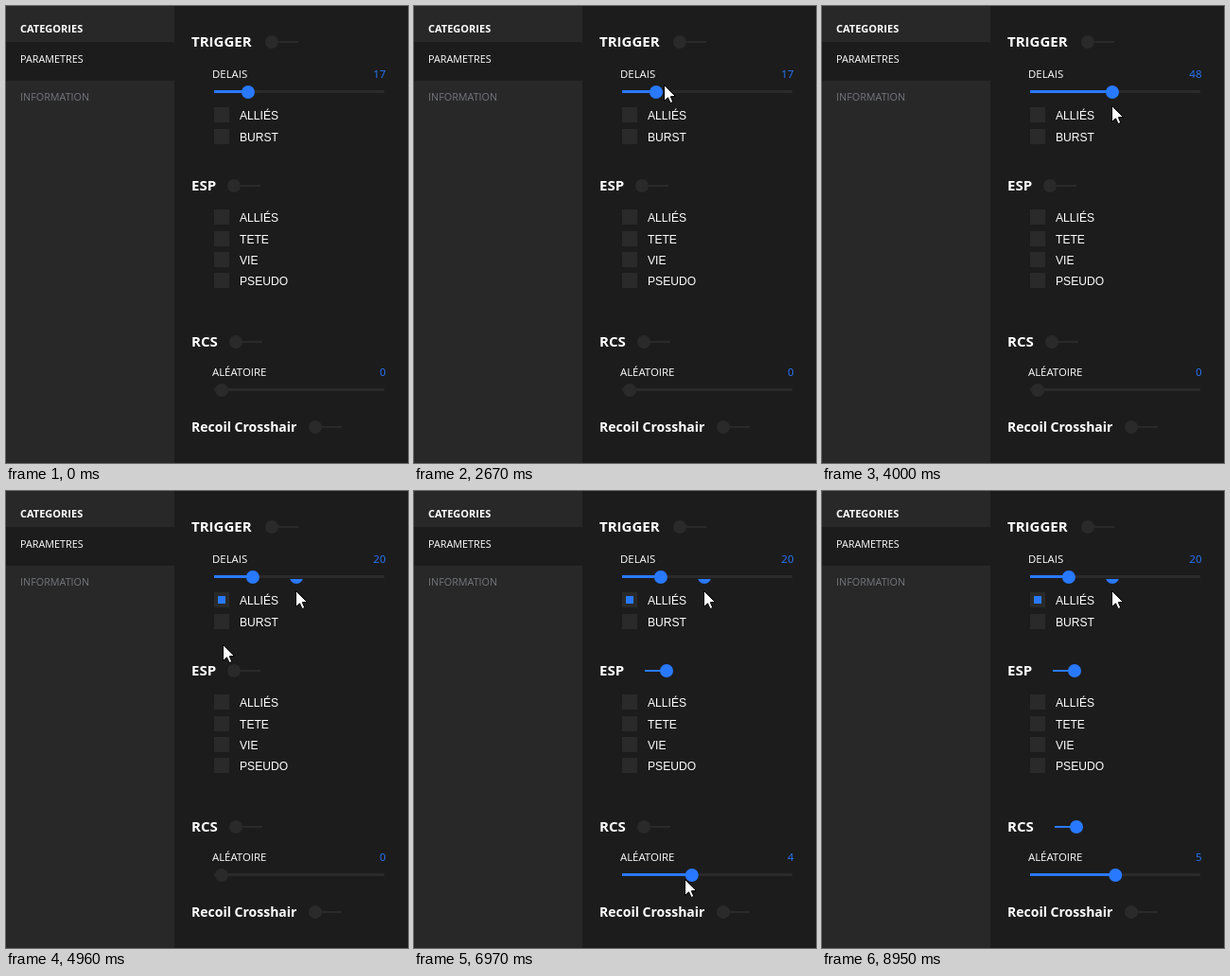
Recreate the animation shown at these times as an HTML page with a canvas. Size 425 by 483 pixels, loop 9.81 s.

```html
<!DOCTYPE html>
<html lang="fr">
<head>
<meta charset="utf-8">
<title>Parametres</title>
<style>
  html, body { margin: 0; width: 100%; height: 100%; overflow: hidden; background: #1c1c1c; }
  canvas { display: block; width: 425px; height: 483px; }
</style>
</head>
<body>
<canvas id="stage"></canvas>
<script>
const W = 425, H = 483, LOOP = 9810, STEP = 73.4;
const BG = '#1c1c1c', PANEL = '#282828', DARK = [42, 42, 42], BLUE = [41, 121, 255];
const canvas = document.getElementById('stage');
const ctx = canvas.getContext('2d');
const dpr = window.devicePixelRatio || 1;
canvas.width = W * dpr;
canvas.height = H * dpr;
ctx.scale(dpr, dpr);

// Pointer moves: start, end, x and y reached
const START = [239, 500];
const MOVES = [
  [60, 930, 272, 36],
  [1390, 1470, 279, 36],
  [2080, 2220, 289, 38],
  [2530, 2890, 254, 101],
  [3420, 3720, 350, 99],
  [3790, 4000, 306, 105],
  [4080, 4160, 260, 106],
  [4230, 4520, 225, 118],
  [4900, 5180, 232, 193],
  [5340, 5920, 250, 356],
  [6000, 6300, 232, 409],
  [6590, 6970, 286, 410],
  [7270, 7410, 307, 405],
  [7480, 8230, 237, 354],
  [8290, 8950, 354, 500]
];

const lerp = (a, b, p) => a + (b - a) * p;
const easeOut = p => Math.sin(p * Math.PI / 2);
const mix = p => `rgb(${DARK.map((v, i) => Math.round(lerp(v, BLUE[i], p))).join()})`;

// The screen refreshes in steps while the pointer moves
function pointer(t) {
  let [x, y] = START;
  for (const [start, end, toX, toY] of MOVES) {
    if (t < start) break;
    const count = Math.round((end - start) / STEP) + 1;
    const done = Math.floor((t - start) / STEP + 0.2) + 1;
    const p = easeOut(Math.min(1, done / count));
    x = lerp(x, toX, p);
    y = lerp(y, toY, p);
  }
  return [Math.round(x), Math.round(y)];
}

// A dragged slider follows the pointer and keeps its last value
function dragged(t, start, end, first, max) {
  if (t < start) return first;
  const [x] = pointer(Math.min(t, end));
  return Math.max(0, Math.round((x - 227) / 164.5 * max));
}

// A switch passes through one half-way step
const flip = (t, start) => t < start ? 0 : t < start + 70 ? 0.5 : 1;

function box(x, y, w, h, color) {
  ctx.fillStyle = color;
  ctx.fillRect(x, y, w, h);
}

function dot(x, y, color) {
  ctx.fillStyle = color;
  ctx.beginPath();
  ctx.arc(x, y, 7, 0, Math.PI * 2);
  ctx.fill();
}

function text(str, x, y, size, color = '#fff', weight = 500, family = '"Open Sans"', align = 'left') {
  ctx.font = `${weight} ${size}px ${family}, sans-serif`;
  ctx.fillStyle = color;
  ctx.textAlign = align;
  ctx.fillText(str, x, y);
}

function toggle(title, x, y, on, size = 15) {
  text(title, 196, y + 5, size, '#fff', 700);
  const left = on ? x + 3 : x;
  const right = on === 1 ? x + 20 : x + 28;
  box(left, y - 1, right - left, 2, mix(on));
  dot(x + 26 * on, y, mix(on));
}

function slider(title, y, value, max) {
  const x = 228 + 164.5 * value / max;
  text(title, 218, y - 15, 11.4);
  text(String(value), 401.5, y - 15, 11.5, mix(1), 500, '"Open Sans"', 'right');
  box(220, y - 2, 180, 3, mix(0));
  if (value) box(220, y - 2, x - 220, 3, mix(1));
  dot(x, y, mix(value ? 1 : 0));
}

function check(label, y, on) {
  box(220, y - 8, 16, 16, mix(0));
  if (on) box(224, y - 4, 8, 8, mix(1));
  text(label, 247, y + 5, 12.1, '#fff', 400, '"Liberation Sans"');
}

function arrow(x, y) {
  ctx.save();
  ctx.translate(x + 0.5, y + 0.5);
  const shape = new Path2D('M0 0V17L4 13.3L6.6 19L9.3 17.9L6.8 12.2L12 12Z');
  ctx.fillStyle = '#fff';
  ctx.fill(shape);
  ctx.strokeStyle = '#000';
  ctx.stroke(shape);
  ctx.restore();
}

// Remains of the drag left on screen under the slider
function trail() {
  ctx.save();
  ctx.beginPath();
  ctx.rect(275, 93, 127, 31);
  ctx.clip();
  dot(307, 91, mix(1));
  arrow(306, 105);
  ctx.restore();
}

function draw(t) {
  box(0, 0, W, H, BG);
  box(0, 0, 178, H, PANEL);
  box(0, 38, 178, 41, BG);
  text('CATEGORIES', 15, 28, 11, '#fff', 700);
  text('PARAMETRES', 15, 60, 10.8);
  text('INFORMATION', 15, 100, 10.8, '#75777d');

  toggle('TRIGGER', 281, 38, flip(t, 1860) - flip(t, 2530));
  slider('DELAIS', 91, dragged(t, 3420, 4160, 17, 100), 100);
  check('ALLIÉS', 115, t >= 4660);
  check('BURST', 138);

  toggle('ESP', 241, 190, flip(t, 5340));
  ['ALLIÉS', 'TETE', 'VIE', 'PSEUDO'].forEach((label, i) =>
    check(label, Math.round(223.3 + 22.3 * i)));

  toggle('RCS', 243, 355, flip(t, 8290));
  slider('ALÉATOIRE', 406, dragged(t, 6590, 7410, 0, 10), 10);
  toggle('Recoil Crosshair', 327, 445, 0, 14);

  if (t >= 4060) trail();
  const [x, y] = pointer(t);
  if (y < H) arrow(x, y);
}

const begin = performance.now();
function tick() {
  draw((performance.now() - begin) % LOOP);
  requestAnimationFrame(tick);
}
tick();
</script>
</body>
</html>
```
